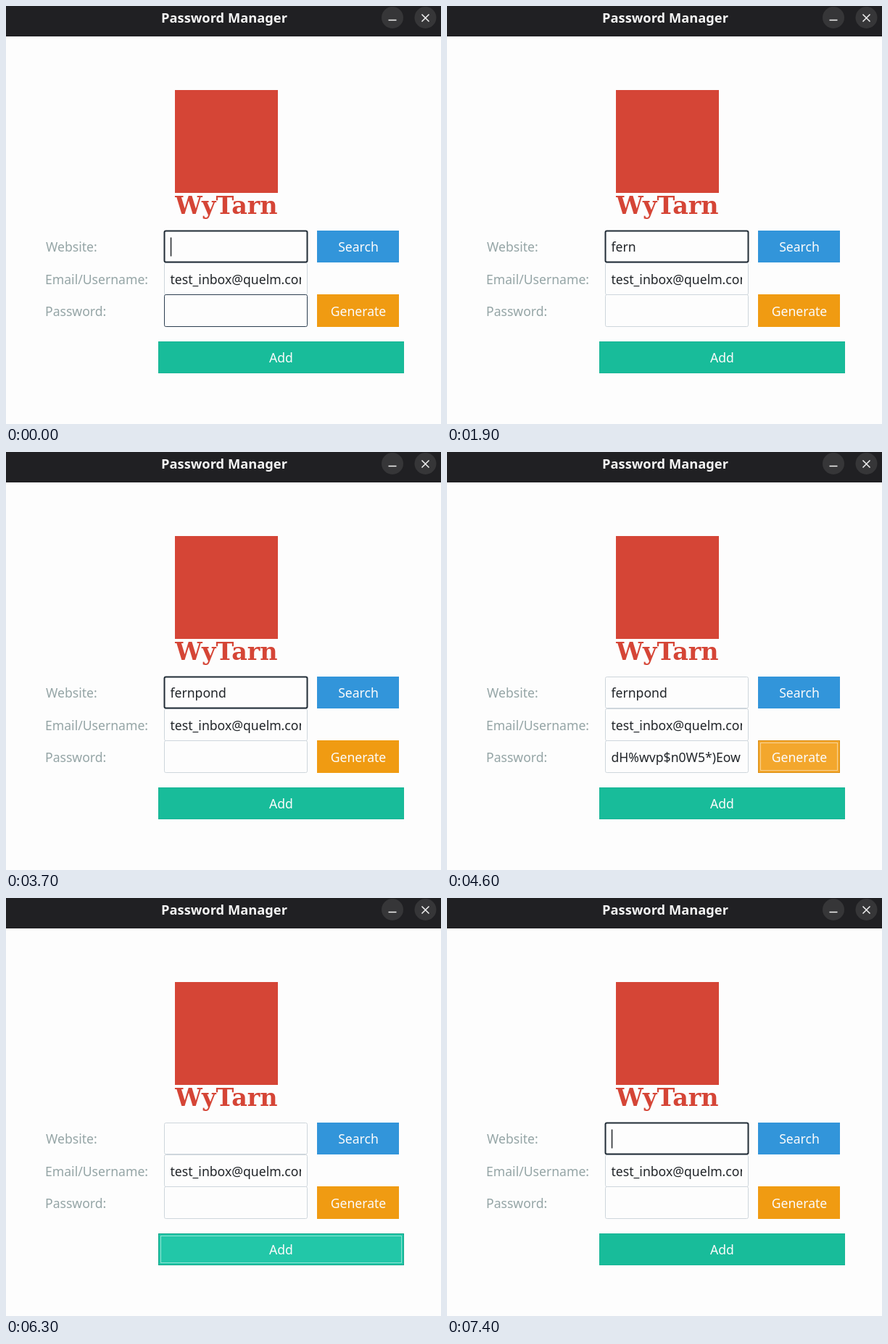
An HTML page that plays this animation: 600x577 px, repeating every 8000 ms.

```html
<!DOCTYPE html>
<html lang="en">
<head>
<meta charset="utf-8">
<title>Password Manager</title>
<style>
  html, body { margin: 0; width: 100%; height: 100%; overflow: hidden; background: #fdfdfd; }
  svg { display: block; width: 100%; height: 100%; font: 17.6px "Noto Sans", "Open Sans", sans-serif; }
  text { white-space: pre; }
  .title { font-size: 18.3px; font-weight: 700; fill: #f4f4f4; }
  .control { fill: #363638; }
  .glyph { fill: none; stroke: #f2f2f2; stroke-width: 1.5; }
  .brand { font: 700 33.4px "DejaVu Serif", serif; }
  .red { fill: #d54536; }
  .label { fill: #95a5a6; }
  .middle { text-anchor: middle; }
  .value { fill: #212529; }

  .field rect { fill: #fdfdfd; stroke: #ced6dc; stroke-width: 1; }
  .field.hover rect { stroke: #2c3e50; }
  .field.focus rect { stroke: #212c36; stroke-width: 2; }

  .button .face { fill: var(--face); stroke: var(--edge); stroke-width: 1; }
  .button.hover .face { fill: var(--hover); }
  .button.focus .face { stroke: var(--focus-edge); }
  .button .ring { fill: none; stroke: #fff; stroke-dasharray: 1 1; visibility: hidden; }
  .button.focus .ring { visibility: visible; }
  .button text { fill: #fbfbfb; }
  #search { --face: #3295da; --edge: #3295da; }
  #generate { --face: #f09b12; --hover: #f3a72d; --edge: #f09b12; --focus-edge: #d98c12; }
  #add { --face: #18bc9a; --hover: #22c7a8; --edge: #18b596; --focus-edge: #15a589; }
  #caret { fill: #212529; }
</style>
</head>
<body>
<svg viewBox="0 0 600 577" preserveAspectRatio="none">
  <clipPath id="inner"><rect x="225" y="300" width="182" height="150"/></clipPath>

  <rect width="600" height="577" fill="#fdfdfd"/>
  <rect width="600" height="42" fill="#202023"/>
  <text class="title middle" x="301" y="22.5">Password Manager</text>
  <circle class="control" cx="533" cy="16" r="15"/>
  <circle class="control" cx="578.5" cy="16" r="15"/>
  <path class="glyph" d="M527.5 19.5h11M573.5 11.5l10 10m0-10l-10 10"/>

  <rect class="red" x="233" y="116" width="142" height="142"/>
  <text class="brand red middle" x="304" y="287">WyTarn</text>

  <text class="label" x="55" y="339">Website:</text>
  <text class="label" x="54" y="383.5">Email/Username:</text>
  <text class="label" x="54" y="428">Password:</text>

  <g class="field" id="email">
    <rect x="218.5" y="354.5" width="197" height="44" rx="2"/>
    <text class="value" x="226.5" y="383.5" clip-path="url(#inner)">test_inbox@quelm.com</text>
  </g>
  <g class="field" id="password">
    <rect x="218.5" y="398.5" width="197" height="44" rx="2"/>
    <text class="value" x="226.5" y="428" clip-path="url(#inner)"></text>
  </g>
  <g class="field" id="website">
    <rect x="218.5" y="310.5" width="197" height="43" rx="2"/>
    <text class="value" x="226.5" y="339" clip-path="url(#inner)"></text>
  </g>
  <rect id="caret" y="319.5" width="1.5" height="26"/>

  <g class="button" id="search">
    <rect class="face" x="429.5" y="310.5" width="112" height="43"/>
    <text class="middle" x="486" y="339">Search</text>
  </g>
  <g class="button" id="generate">
    <rect class="face" x="429.5" y="398.5" width="112" height="44"/>
    <rect class="ring" x="432.5" y="401.5" width="106" height="38"/>
    <text class="middle" x="486" y="428">Generate</text>
  </g>
  <g class="button" id="add">
    <rect class="face" x="210.5" y="463.5" width="338" height="43"/>
    <rect class="ring" x="213.5" y="466.5" width="332" height="37"/>
    <text class="middle" x="379.5" y="492">Add</text>
  </g>
</svg>
<script>
  const LOOP = 8000;
  const SITE = "fernpond";
  const SECRET = "dH%wvp$n0W5*)Eow";
  const KEY_TIMES = [1400, 1500, 1700, 1800, 2400, 2700, 2900, 3000];

  // Each track lists [start time, value] pairs.
  const focusTrack = [[0, "website"], [4500, "generate"], [6300, "add"], [7400, "website"]];
  const hoverTrack = [
    [0, "password"], [100, ""], [4100, "generate"], [5400, ""], [5500, "add"],
    [7100, ""], [7200, "password"], [7300, "website"], [7400, ""]
  ];

  const byId = id => document.getElementById(id);
  const valueAt = (track, t) => track.findLast(([start]) => t >= start)[1];
  const parts = ["website", "email", "password", "generate", "add"].map(byId);
  const siteText = byId("website").querySelector("text");
  const secretText = byId("password").querySelector("text");
  const caret = byId("caret");

  // 600 ms on, 300 ms off, restarted when the field regains focus.
  function caretOn(t) {
    if (t >= 7400) return true;
    return t < 4500 && (t + 500) % 900 < 600;
  }

  function draw(t) {
    const focus = valueAt(focusTrack, t);
    const hover = valueAt(hoverTrack, t);
    for (const part of parts) {
      part.classList.toggle("focus", part.id === focus);
      part.classList.toggle("hover", part.id === hover);
    }
    const typed = t < 6300 ? KEY_TIMES.filter(k => t >= k).length : 0;
    siteText.textContent = SITE.slice(0, typed);
    secretText.textContent = t >= 4600 && t < 6300 ? SECRET : "";
    const width = typed ? siteText.getComputedTextLength() : 0;
    caret.setAttribute("x", 226.8 + width);
    caret.style.visibility = caretOn(t) ? "visible" : "hidden";
  }

  const start = performance.now();
  function tick() {
    draw((performance.now() - start) % LOOP);
    requestAnimationFrame(tick);
  }
  tick();
</script>
</body>
</html>
```
